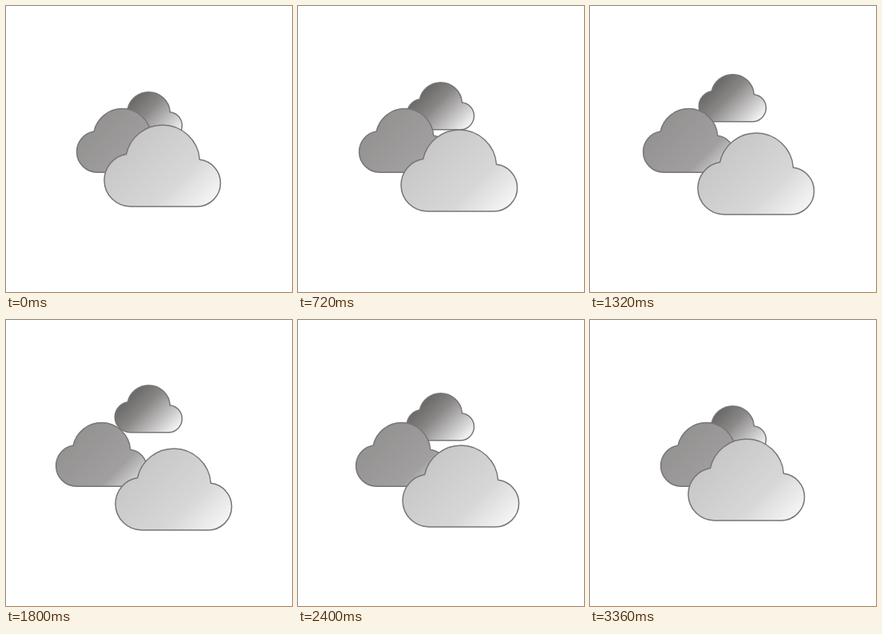
Animation of 358x358 px, one loop 3.48 s. Source, as an HTML page:

```html
<!DOCTYPE html>
<html lang="en">
<head>
<meta charset="utf-8">
<title>Drifting clouds</title>
<style>
  html, body { margin: 0; width: 100%; height: 100%; overflow: hidden; background: #fff; }
  svg { display: block; width: 358px; height: 358px; }
  path { stroke: #777676; stroke-width: 1.5; vector-effect: non-scaling-stroke; }
</style>
</head>
<body>
<svg viewBox="0 0 358 358">
  <defs>
    <linearGradient id="diagonal" gradientUnits="userSpaceOnUse" x1="11" y1="-11" x2="135" y2="113"/>
    <linearGradient id="dark" href="#diagonal">
      <stop offset=".2" stop-color="#686565"/>
      <stop offset=".46" stop-color="#8a8787"/>
      <stop offset=".9" stop-color="#f0f0f0"/>
    </linearGradient>
    <linearGradient id="mid" href="#diagonal">
      <stop offset=".15" stop-color="#939090"/>
      <stop offset=".7" stop-color="#a19f9f"/>
      <stop offset=".93" stop-color="#dedede"/>
    </linearGradient>
    <linearGradient id="light" href="#diagonal">
      <stop offset=".15" stop-color="#c5c5c5"/>
      <stop offset=".65" stop-color="#d7d7d7"/>
      <stop offset=".93" stop-color="#f5f5f5"/>
    </linearGradient>
  </defs>
  <path id="back" fill="url(#dark)"/>
  <path id="middle" fill="url(#mid)"/>
  <path id="front" fill="url(#light)"/>
</svg>
<script>
  const STEP = 120, COUNT = 29, PEAK = 14;

  // Outline 145.5 x 102: left lobe, dome, right lobe, flat base
  const CLOUD = 'M33 102 A33 33 0 0 1 0 69 A33 33 0 0 1 27.6 36.5 ' +
                'A46.5 46.5 0 0 1 73 0 A46.5 46.5 0 0 1 119.4 43.2 ' +
                'A29.5 29.5 0 0 1 145.5 72.5 A29.5 29.5 0 0 1 116 102 Z';

  // Resting place, scale, and offset after n steps away from rest
  const clouds = [
    { id: 'back', x: 136.3, y: 107.7, scale: .578, move: n => [0, -2 * n] },
    { id: 'middle', x: 88.6, y: 128.6, scale: .78, move: n => [-2 * n, 0] },
    { id: 'front', x: 123, y: 149, scale: 1,
      move: n => [2 * Math.floor(8 * n / PEAK), 2 * Math.ceil(6 * n / PEAK)] }
  ];

  for (const c of clouds) {
    c.node = document.getElementById(c.id);
    c.node.setAttribute('d', CLOUD);
  }

  function draw(time) {
    const tick = Math.floor(time / STEP) % COUNT;
    const n = PEAK - Math.abs(PEAK - tick);
    for (const c of clouds) {
      const [dx, dy] = c.move(n);
      c.node.setAttribute('transform', `translate(${c.x + dx} ${c.y + dy}) scale(${c.scale})`);
    }
  }

  const start = performance.now();
  function loop() {
    draw(performance.now() - start);
    requestAnimationFrame(loop);
  }
  loop();
</script>
</body>
</html>
```
